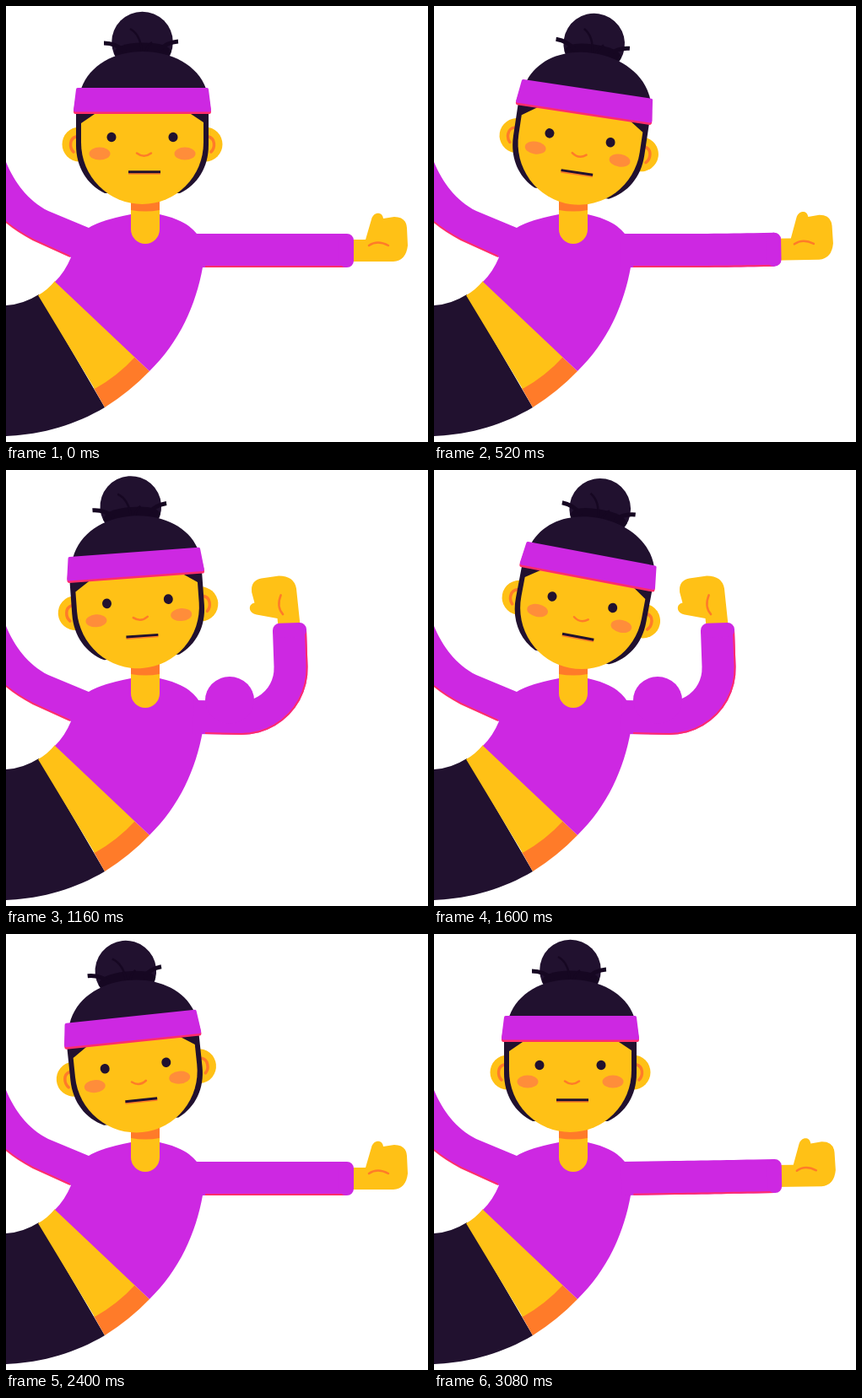
These frames come from a looping animation (500x517 px, 3120 ms). An HTML page:

```html
<!DOCTYPE html>
<html lang="en">
<head>
<meta charset="utf-8">
<title>Flex</title>
<style>
  html, body { margin: 0; width: 100%; height: 100%; overflow: hidden; background: #fff; }
  svg { display: block; width: 500px; height: 517px; }
  .skin { fill: #ffc116; }
  .top { fill: #cd28e2; }
  .dark { fill: #21112f; }
  .shade { fill: #ff7b29; }
  .cheek { fill: #ff8d3a; }
  .line { fill: none; stroke: #ff7b29; stroke-width: 2.5; stroke-linecap: round; }
  .strand { fill: none; stroke: #160722; }
  .edge { fill: none; stroke: #ff2d6b; stroke-width: 2; }
  #sleeve { fill: none; stroke: #cd28e2; stroke-width: 40; }
</style>
</head>
<body>
<svg viewBox="0 0 500 517">
  <!-- body -->
  <path class="dark" d="M39 342Q20 354 0 355V510C45 508 83 496 117 476Z"/>
  <path class="shade" d="M152 416L170 433Q147 457 117 476L104 453Z"/>
  <path class="skin" d="M58 326L153 416Q132 439 105 454L38 343Q49 337 58 326Z"/>
  <path class="top" d="M0 185C10 209 26 231 50 243L98 263Q112 254 148 247H182C205 252 218 260 226 270L240 290L233 310C225 354 206 398 170 433L58 327Q70 315 77 298L32 277Q13 267 0 256Z"/>
  <path class="edge" d="M0 256Q13 267 32 277L76 297"/>
  <path class="skin" d="M148 225H182V265A17 17 0 0 1 148 265Z"/>
  <path class="shade" d="M148 225H182V242Q165 245 148 242Z"/>

  <!-- flexing arm -->
  <g id="arm">
    <g id="hand">
      <path class="skin" d="M-8-13H14L21-37C23-46 34-47 35-38L48-40Q62-40 63-27L64-6Q62 12 47 13H-8Z"/>
      <path class="line" d="M18-6Q28-13 41-6"/>
    </g>
    <path id="sleeve"/>
    <path id="sleeveEdge" class="edge"/>
    <rect id="cuff" class="top" x="-17" y="-20" width="17" height="40" rx="8"/>
    <ellipse id="bicep" class="top" cx="265" cy="273" rx="29"/>
  </g>

  <!-- head -->
  <g id="head">
    <circle class="skin" cx="87" cy="164" r="20.5"/>
    <circle class="skin" cx="236" cy="164" r="20.5"/>
    <path class="line" style="stroke-width:3.5" d="M83 155C75 157 75 168 80 173M240 155C248 157 248 168 243 173"/>
    <circle class="dark" cx="161.500" cy="43" r="36.300"/>
    <path fill="#160722" d="M128 56Q130 44 161 43.500Q192 43 196 54L190 64H134Z"/>
    <path class="strand" stroke-width="5" d="M116 44Q130 44 141 54M204 42Q190 43 181 53"/>
    <path class="strand" stroke-width="2.5" d="M147 27Q160 34 161 56M165 56Q167 47 173 43"/>
    <path class="dark" d="M89 98C99 70 128 54 162 54S227 70 237 98L240 125V165C240 191 227 212 206 222H117C96 212 83 191 83 165V125Z"/>
    <path class="skin" d="M89 139L108 126H216L234 138V162A72.500 73 0 0 1 89 162Z"/>
    <path fill="#ff2d6b" d="M82 112H241L243 125Q243 128 241 128H82Q80 128 80 125Z"/>
    <path class="top" d="M85 97H238Q240 97 240 99L243 123Q243 125.500 241 125.500H82Q80 125.500 80 123L83 99Q83 97 85 97Z"/>
    <ellipse class="dark" cx="125" cy="155.500" rx="5.5" ry="5.8"/>
    <ellipse class="dark" cx="198" cy="155.500" rx="5.5" ry="5.8"/>
    <ellipse class="cheek" cx="111" cy="175" rx="12.5" ry="7.5"/>
    <ellipse class="cheek" cx="212" cy="175" rx="12.5" ry="7.5"/>
    <path class="line" d="M155 174.500Q163.500 181 172 174.500"/>
    <path class="shade" d="M145 197H183V199.800H145Z"/>
    <path class="dark" d="M145 195.300H183V198.200H145Z"/>
  </g>
</svg>
<script>
const LOOP = 3120, STEP = 40;
const el = id => document.getElementById(id);
const arm = el('arm'), hand = el('hand'), sleeve = el('sleeve'), sleeveEdge = el('sleeveEdge'),
      cuff = el('cuff'), bicep = el('bicep'), head = el('head');

// [time, value] keys
const TILT = [[0, 0], [430, 9.4], [1030, -6.3], [1590, 10.7], [2195, -6.3], [2320, -6.3], [2840, 0]];
const FLEX = [[480, 0], [1080, 1], [1630, 1], [2230, 0]];
const LIFT = [[2880, 0], [3120, 1]];

const ease = x => (1 - Math.cos(Math.PI * x)) / 2;

function sample(keys, t) {
  if (t <= keys[0][0]) return keys[0][1];
  for (let i = 1; i < keys.length; i++) {
    const [t0, a] = keys[i - 1], [t1, b] = keys[i];
    if (t < t1) return a + (b - a) * ease((t - t0) / (t1 - t0));
  }
  return keys[keys.length - 1][1];
}

// Upper arm, a bend of constant length, then the forearm; offset moves outwards.
function armLine(flex, offset, startX, trim) {
  const angle = Math.max(flex * 92 * Math.PI / 180, 1e-4);
  const radius = 94 / angle, r = radius + offset;
  const x = 285 - 6 * flex ** 3, y = 290 + 4 * flex;
  const fore = 33 - 62 * flex + 81 * flex * flex - trim;
  const c = Math.cos(angle), s = Math.sin(angle);
  const points = [`M${startX} ${y + offset - flex}L${x} ${y + offset}`];
  const bend = 12;
  for (let i = 1; i <= bend; i++) {
    const a = angle * i / bend;
    points.push(`L${x + r * Math.sin(a)} ${y - radius + r * Math.cos(a)}`);
  }
  const endX = x + r * s + fore * c, endY = y - radius + r * c - fore * s;
  points.push(`L${endX} ${endY}`);
  return { d: points.join(''), endX, endY, degrees: -angle * 180 / Math.PI };
}

function draw(t) {
  head.setAttribute('transform', `rotate(${sample(TILT, t)} 162 233)`);

  const flex = sample(FLEX, t);
  const end = armLine(flex, 0, 222, 0);
  const place = `translate(${end.endX} ${end.endY}) rotate(${end.degrees})`;
  sleeve.setAttribute('d', armLine(flex, 0, 222, 8).d);
  sleeveEdge.setAttribute('d', armLine(flex, 19, 236, 9).d);
  cuff.setAttribute('transform', place);
  hand.setAttribute('transform', `${place} translate(${-7 * flex ** 0.25} 0) rotate(${-4 * flex})`);
  bicep.setAttribute('ry', 28 * flex ** 1.1);
  arm.setAttribute('transform', `rotate(${-sample(LIFT, t)} 225 290)`);
}

const start = performance.now();
function tick() {
  const t = (performance.now() - start) % LOOP;
  draw(Math.floor(t / STEP) * STEP);
  requestAnimationFrame(tick);
}
draw(0);
requestAnimationFrame(tick);
</script>
</body>
</html>
```
